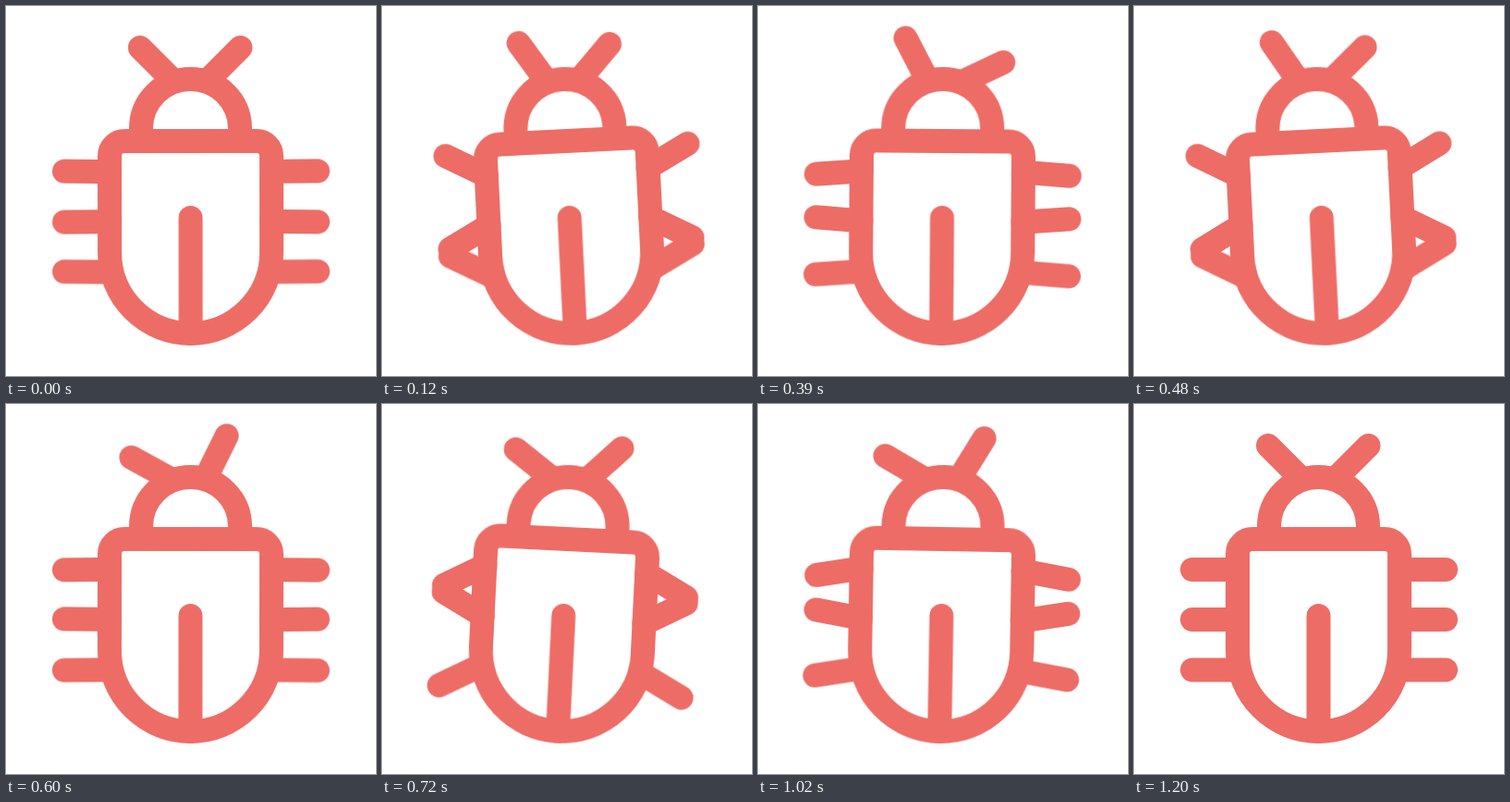
Write an HTML page without scripts that moves like this. It is 400 by 400 pixels and loops after 2.23 s.

```html
<!DOCTYPE html>
<html lang="en">
<head>
<meta charset="utf-8">
<title>Bug</title>
<style>
  html, body { margin: 0; height: 100%; overflow: hidden; background: #fff; }
  svg { display: block; width: 100%; height: 100%; }

  .bug {
    fill: none;
    stroke: #ee6c66;
    stroke-width: 26;
    stroke-linecap: round;
    stroke-linejoin: round;
    --wave: cubic-bezier(.364, 0, .636, 1);
  }
  .sway, .feeler { animation: sway 2230ms var(--wave) infinite; }

  .bug { --a: -3deg; transform-origin: 199.5px 164px; }
  .up { --a: 30deg; }
  .down { --a: -30deg; }

  .left.top { transform-origin: 112px 179px; }
  .left.mid { transform-origin: 112px 233px; }
  .left.low { transform-origin: 112px 287.5px; }
  .right.top { transform-origin: 287px 179px; }
  .right.mid { transform-origin: 287px 233px; }
  .right.low { transform-origin: 287px 287.5px; }

  .feeler.left { transform-origin: 185px 85px; animation-name: feel-left; }
  .feeler.right { transform-origin: 213.5px 85px; animation-name: feel-right; }

  /* three sine cycles of 400 ms, then rest */
  @keyframes sway {
    0% { transform: rotate(0deg); animation-timing-function: cubic-bezier(.333, .524, .667, 1); }
    4.484%, 22.422%, 40.359% { transform: rotate(var(--a)); }
    13.453%, 31.39% { transform: rotate(calc(var(--a) * -1)); }
    49.327% { transform: rotate(calc(var(--a) * -1)); animation-timing-function: cubic-bezier(.333, 0, .667, .476); }
    53.812%, 100% { transform: rotate(0deg); }
  }
  @keyframes feel-left {
    0%, 53.81%, 100% { transform: rotate(0deg); }
    2.91%, 18.83%, 38.7% { transform: rotate(20deg); }
    11.21%, 28.92%, 47.76% { transform: rotate(-20deg); }
  }
  @keyframes feel-right {
    0%, 51.12%, 100% { transform: rotate(0deg); }
    2.24%, 18.39% { transform: rotate(20deg); }
    8.21%, 25.43% { transform: rotate(-20deg); }
    38.34% { transform: rotate(16.5deg); }
    44.84% { transform: rotate(-15deg); }
  }
</style>
</head>
<body>
<svg viewBox="0 0 400 400">
  <g class="bug sway">
    <path class="feeler left" d="M145 45L178 78"/>
    <path class="feeler right" d="M253.5 45L220.5 78"/>

    <path class="sway left top up" d="M63 179H112"/>
    <path class="sway left mid down" d="M63 233H112"/>
    <path class="sway left low up" d="M63 287.5H112"/>
    <path class="sway right top down" d="M337 179H287"/>
    <path class="sway right mid up" d="M337 233H287"/>
    <path class="sway right low down" d="M337 287.5H287"/>

    <path stroke-linecap="butt" d="M146 146V132.5a53.5 53.5 0 0 1 107 0V146"/>
    <path d="M112 266.5V162a16 16 0 0 1 16-16H271a16 16 0 0 1 16 16V266.5a87.5 87.5 0 0 1-175 0z"/>
    <path d="M199.5 229V354"/>
  </g>
</svg>
</body>
</html>
```
